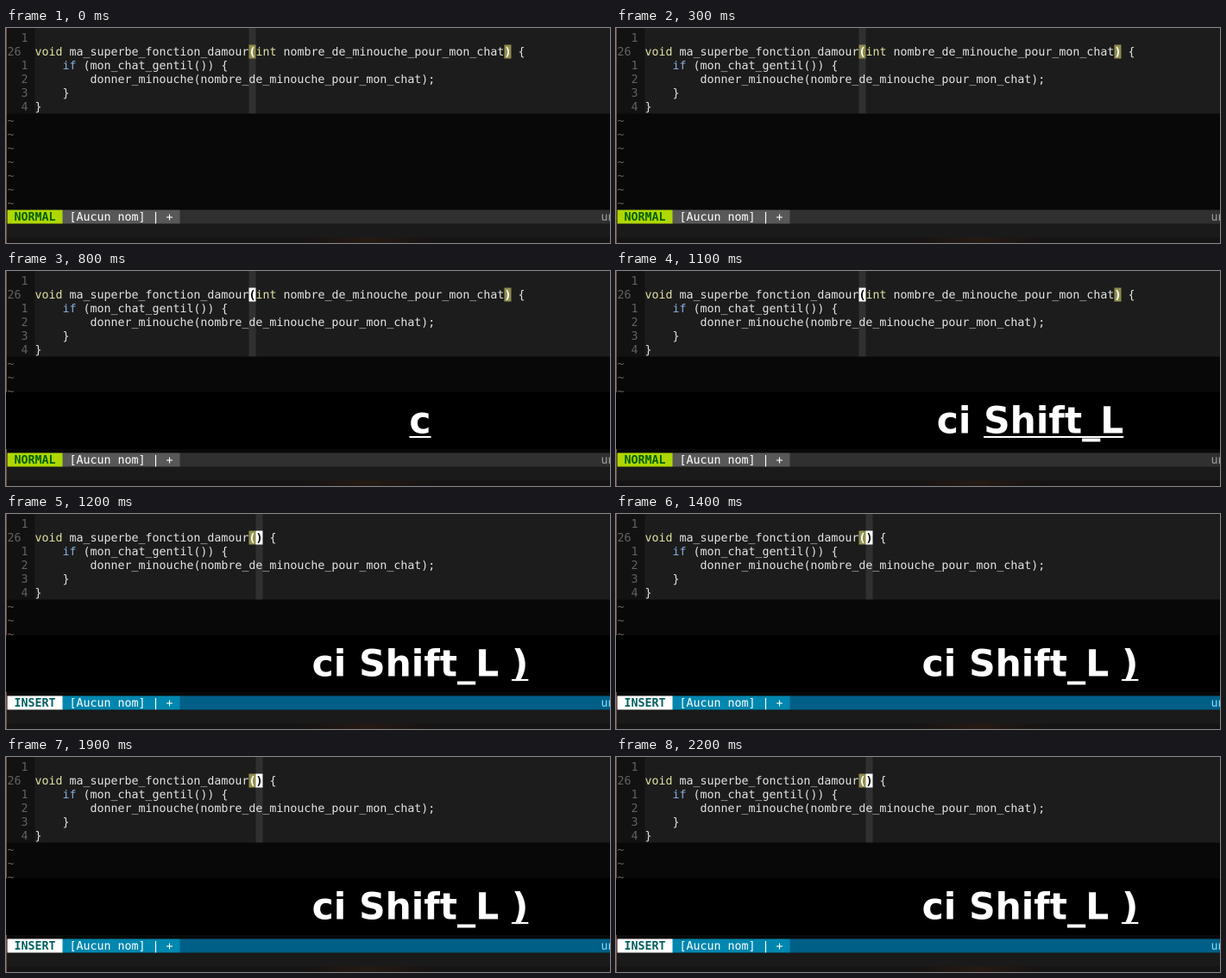
An HTML page with a canvas for the animation above (2300 ms loop, 700 px wide and 250 px high).

```html
<!DOCTYPE html>
<html lang="fr">
<head>
<meta charset="utf-8">
<title>Vim : ci)</title>
<style>
html, body { margin: 0; width: 700px; height: 250px; overflow: hidden; background: #080808; }
canvas { display: block; width: 700px; height: 250px; }
</style>
</head>
<body>
<canvas id="stage" width="1400" height="500"></canvas>
<script>
const ctx = document.getElementById('stage').getContext('2d');
ctx.scale(2, 2); // drawn at double size, so that half pixels blend smoothly

const LOOP = 2300, CELL = 8, ROW = 16, LEFT = 1.5, TOP = 3.5;
const GUTTER = LEFT + 4 * CELL;
const END = TOP + 6 * ROW;
const MONO = '"DejaVu Sans Mono", monospace';
const KEY_FONT = 'bold 42.4px "DejaVu Sans", sans-serif';
const PALE = '#e4e4e4', KHAKI = '#e2e2a2', BLUE = '#87afdf', DIM = '#626262';
const KEYS = [[700, '', 'c'], [900, 'c', 'i'], [1100, 'ci ', 'Shift_L'], [1200, 'ci Shift_L ', ')']];
const HEAD = 'void ma_superbe_fonction_damour(';
const ARGS = 'int nombre_de_minouche_pour_mon_chat';

const MODES = {
  normal: { name: 'NORMAL', fg: '#005f00', bg: '#afd700', file: '#585858', bar: '#303030', info: '#9e9e9e' },
  insert: { name: 'INSERT', fg: '#005f5f', bg: '#ffffff', file: '#0087af', bar: '#005f87', info: '#87dfff' }
};

function box(x, y, w, h, color) {
  ctx.fillStyle = color;
  ctx.fillRect(x, y, w, h);
}

function write(str, x, row, color, bold) {
  ctx.font = (bold ? 'bold ' : '') + '13.29px ' + MONO;
  ctx.fillStyle = color;
  ctx.fillText(str, x, TOP + 12.5 + row * ROW);
}

const code = (str, col, row, color = PALE) => write(str, GUTTER + col * CELL, row, color);

function marked(ch, col, isCursor) {
  const x = GUTTER + col * CELL;
  box(x, TOP + ROW, CELL, ROW, isCursor ? '#ffffff' : '#908f4e');
  write(ch, x, 1, isCursor ? '#000000' : '#ffffff', true);
}

function drawEditor(insert, focused) {
  box(0, 0, 700, 250, '#080808');
  box(0, 0, GUTTER, END, '#121212');
  box(GUTTER, 0, 700 - GUTTER, END, '#1c1c1c');
  const open = HEAD.length - 1;
  box(GUTTER + (insert ? open + 1 : open) * CELL, 0, CELL, END, '#303030');

  ['1', '26', '1', '2', '3', '4'].forEach((n, row) =>
    write(n, row === 1 ? LEFT : LEFT + 2 * CELL, row, DIM));
  for (let row = 6; row < 13; row++) write('~', LEFT, row, DIM);

  const close = open + 1 + (insert ? 0 : ARGS.length);
  code('void', 0, 1, KHAKI);
  code(HEAD.slice(5, -1), 5, 1);
  if (!insert) {
    code('int', open + 1, 1, KHAKI);
    code(ARGS.slice(4), open + 5, 1);
  }
  marked('(', open, focused && !insert);
  marked(')', close, insert);
  code('{', close + 2, 1);
  code('if', 4, 2, BLUE);
  code('(mon_chat_gentil()) {', 7, 2);
  code('donner_minouche(nombre_de_minouche_pour_mon_chat);', 8, 3);
  code('}', 4, 4);
  code('}', 0, 5);
}

function drawStatus(mode) {
  const y = TOP + 13 * ROW;
  const under = y + 2 * ROW;
  box(0, y + ROW, 700, ROW, '#1a1a1a');
  const glow = ctx.createLinearGradient(340, 0, 500, 0);
  glow.addColorStop(0, '#151313');
  glow.addColorStop(0.5, '#261a13');
  glow.addColorStop(1, '#151313');
  box(0, under, 700, 250 - under, glow);

  box(LEFT, y, 700 - LEFT, ROW, mode.bar);
  box(LEFT, y, 8 * CELL, ROW, mode.bg);
  box(LEFT + 8 * CELL, y, 17 * CELL, ROW, mode.file);
  write(mode.name, LEFT + CELL, 13, mode.fg, true);
  write('[Aucun nom] | +', LEFT + 9 * CELL, 13, '#ffffff');
  write('unix', LEFT + 86 * CELL, 13, mode.info);
  box(0, 0, 1, 250, '#7c4646');
}

function drawKeys([, typed, last]) {
  box(0, 141, 700, 66, '#000000');
  ctx.font = KEY_FONT;
  ctx.fillStyle = '#ffffff';
  const before = ctx.measureText(typed).width;
  const width = ctx.measureText(last).width;
  const x = 480 - (before + width) / 2;
  ctx.fillText(typed + last, x, 188.5);
  ctx.fillRect(x + before, 192, width, 2);
}

function draw(ms) {
  const keys = KEYS.filter(k => k[0] <= ms).pop();
  const insert = ms >= 1200;
  drawEditor(insert, Boolean(keys));
  drawStatus(insert ? MODES.insert : MODES.normal);
  if (keys) drawKeys(keys);
}

const start = performance.now();
function tick() {
  draw((performance.now() - start) % LOOP);
  requestAnimationFrame(tick);
}
tick();
</script>
</body>
</html>
```
